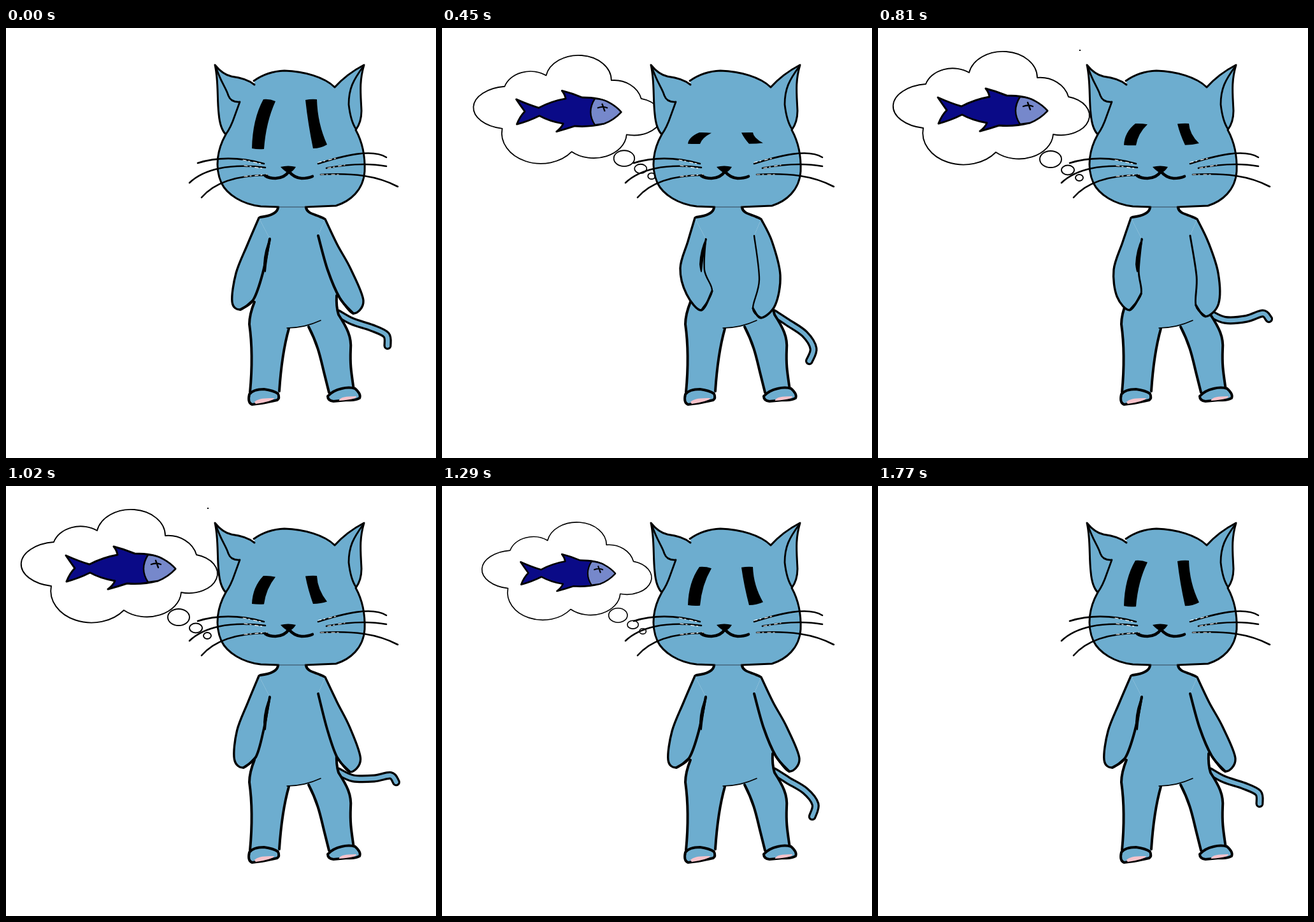
Recreate the animation shown at these times as an HTML page with a canvas. Size 675 by 675 pixels, loop 1800 ms.

```html
<!DOCTYPE html>
<html lang="en">
<head>
<meta charset="utf-8">
<title>Hungry cat</title>
<style>
html, body { margin: 0; width: 100%; height: 100%; overflow: hidden; background: #fff; }
canvas { display: block; width: 675px; height: 675px; }
</style>
</head>
<body>
<canvas id="stage" width="675" height="675"></canvas>
<script>
const ctx = document.getElementById('stage').getContext('2d');
const LOOP = 1800, STEP = 30;
const FUR = '#6dadcf', INK = '#000', PINK = '#f7c3cb';

const path = d => new Path2D(d);
const lerp = (a, b, k) => a + (b - a) * k;

function fill(p, color) { ctx.fillStyle = color; ctx.fill(p); }
function stroke(p, width, color = INK) {
  ctx.lineWidth = width;
  ctx.strokeStyle = color;
  ctx.stroke(p);
}
function shape(p, color, width) { fill(p, color); stroke(p, width); }

// Each key is [time, ...values]; the result is the values at t.
function at(keys, t) {
  let i = 1;
  while (i < keys.length - 1 && keys[i][0] < t) i++;
  const a = keys[i - 1], b = keys[i];
  const k = Math.min(1, Math.max(0, (t - a[0]) / (b[0] - a[0])));
  return a.slice(1).map((v, n) => lerp(v, b[n + 1], k));
}

// Smooth open curve through points.
function curve(pts) {
  const p = new Path2D();
  p.moveTo(...pts[0]);
  for (let i = 0; i < pts.length - 1; i++) {
    const a = pts[i - 1] || pts[i], b = pts[i], c = pts[i + 1], d = pts[i + 2] || c;
    p.bezierCurveTo(
      b[0] + (c[0] - a[0]) / 6, b[1] + (c[1] - a[1]) / 6,
      c[0] - (d[0] - b[0]) / 6, c[1] - (d[1] - b[1]) / 6, c[0], c[1]);
  }
  return p;
}

// ---- thought bubble ----
const cloud = path('M71 157A59 35 0 0 1 75 88A44 35 0 0 1 143 70A54 41 0 0 1 250 78A46 40 0 0 1 299 108A44 30 0 0 1 275 167A54 41 0 0 1 185 195A64 50 0 0 1 71 157Z');
const fish = path('M94 109Q114 118 131 123Q152 112 175 108Q174 101 169 95Q185 99 202 106Q232 106 247 115Q258 121 266 130Q254 143 238 149Q214 155 190 153Q175 158 160 162Q168 156 171 149Q148 145 132 136Q114 145 95 150Q100 137 108 129Q100 118 94 109Z');
const fishHead = path('M223 108Q238 109 247 115Q258 121 266 130Q254 143 238 149L223 151Q209 130 223 108Z');
const fishEye = path('M228 123Q236 120 243 123M235 117L239 128');
const puffs = [[271, 206, 17, 13], [298, 223, 10, 7.5], [316, 235, 6, 5]];
const bubbleIn = [[0, 345, 118, .42], [240, 172, 77, .72], [450, 40, 42, .957], [490, 14, 36, 1]];

function drawBubble(t) {
  if (t === 0 || t >= 1620) return;
  let [x, y, s] = at(bubbleIn, t);
  if (t > 1080) {
    const shrink = .9 * ((t - 1080) / 540) ** 2;
    s = 1 - shrink;
    x = 14 + 296 * shrink;
    y = 36 + 148 * shrink;
  }
  ctx.save();
  ctx.translate(x, y);
  ctx.scale(s, s);
  ctx.translate(-14, -36);
  shape(cloud, '#fff', 1.9);
  for (const [px, py, rx, ry] of puffs) {
    const p = new Path2D();
    p.ellipse(px, py, rx, ry, 0, 0, 7);
    shape(p, '#fff', 1.9);
  }
  shape(fish, '#0a0a87', 3);
  shape(fishHead, '#7688cb', 2.4);
  stroke(fishEye, 2.4);
  ctx.restore();
  if (s === 1) {
    ctx.fillStyle = INK;
    ctx.fillRect(316, 34, 2, 2);
  }
}

// ---- tail: radius, resting angle, swing (degrees) ----
const tailJoints = [[0, 0, 0], [26, 29, 6], [58, 23, 16], [83, 24, 26], [93, 33, 30]];

function drawTail(t) {
  const wave = Math.sin(2 * Math.PI * t / 1180);
  const p = curve(tailJoints.map(([r, rest, swing]) => {
    const a = (rest + swing * wave) * Math.PI / 180;
    return [521 + r * Math.cos(a), 448 + r * Math.sin(a)];
  }));
  stroke(p, 13);
  stroke(p, 6.5, FUR);
}

// ---- body ----
const torso = path('M428 278C428 290 422 295 397 298L414 331C408 375 398 402 390 430C384 445 382 455 382 465C387 500 386 540 383 572L430 572C430 540 436 500 444 471L475 468C492 500 494 520 500 540L507 573L546 568C542 540 540 530 541 505C543 485 535 470 522 450C517 435 521 428 518 415L490 326L501 300C480 295 472 290 470 278Z');
const bodyLines = path('M427 282C426 291 415 295 399 297M471 282C473 292 485 292 499 299M390 430C384 445 382 455 382 465C387 500 386 540 383 572M444 472C436 500 431 540 429 570M475 469C491 500 494 520 499 540L507 572M546 568C542 540 540 530 541 505C543 485 535 470 522 450Q518 437 519 420');
const crotch = path('M441 471Q468 471 494 459');
const feet = [
  ['M382 575Q388 567 405 567Q420 569 427 574Q430 581 426 584Q412 587 402 589L386 591Q379 588 382 575Z',
   'M390 587Q396 580 421 581Q419 586 392 590Z'],
  ['M505 578Q513 569 527 566Q539 563 548 566Q558 575 555 581Q548 585 536 584L514 586Q505 585 505 578Z',
   'M523 584Q525 578 550 578Q551 583 523 585Z']
].map(f => f.map(path));
const wedge = path('M414 330Q405 348 404 371Q406 388 408 382Q410 360 416 331Z');

// Arm outlines from shoulder round the hand to the armpit, hanging and tucked in.
const arms = [
  [[[397, 298], [379, 340], [361, 385], [355, 430], [368, 442], [388, 427], [403, 385], [414, 331]],
   [[397, 298], [386, 335], [374, 377], [384, 418], [407, 443], [424, 413], [412, 380], [414, 331]]],
  [[[501, 300], [520, 340], [541, 378], [561, 428], [545, 448], [524, 424], [505, 380], [490, 326]],
   [[501, 300], [518, 335], [531, 388], [523, 435], [501, 455], [488, 440], [498, 395], [490, 326]]]
];

function drawArms(t) {
  const tuck = t < 1140 ? 1.117 * Math.sin(Math.PI * t / 1140) ** 2 : 0;
  for (const [hang, inward] of arms) {
    const pts = hang.map(([x, y], i) => [lerp(x, inward[i][0], tuck), lerp(y, inward[i][1], tuck)]);
    fill(curve(pts), FUR);
    stroke(curve(pts.slice(0, 6)), 3.4);
    stroke(curve(pts.slice(4)), lerp(4, 2.4, Math.min(1, tuck)));
  }
  fill(wedge, INK);
}

function drawBody(t) {
  fill(torso, FUR);
  stroke(bodyLines, 4);
  stroke(crotch, 1.6);
  for (const [foot, sole] of feet) {
    shape(foot, FUR, 4);
    fill(sole, PINK);
  }
  drawArms(t);
}

// ---- head ----
const skull = path('M390 83Q410 68 437 67C468 68 500 77 516 93Q535 72 562 58C554 85 557 105 558 130Q558 148 549 160C560 180 564 200 563 225C561 255 540 272 518 279L400 280C372 277 347 262 338 243C327 218 332 190 345 167Q336 158 334 135C331 110 334 85 328 58Q340 73 354 76Q378 79 390 88Z');
const skullLine = path('M428 281L400 280C372 277 347 262 338 243C327 218 332 190 345 167Q336 158 334 135C331 110 334 85 328 58Q340 73 354 76Q378 79 390 89M389 83Q410 68 437 67C468 68 500 77 516 93Q535 72 562 58C554 85 557 105 558 130Q558 148 549 160C560 180 564 200 563 225C561 255 540 272 518 279L470 281');
const earLines = path('M329 60C337 85 345 93 349 106Q353 117 367 116Q363 127 359 138Q353 156 345 167M561 60C545 82 538 95 538 120Q541 146 549 158');
const chin = path('M428 281H470');
const nose = path('M431 218Q443 215 455 218Q451 225 444 228Q437 225 431 218Z');
const mouth = path('M444 225Q438 235 423 236Q413 236 407 232M444 225Q452 235 464 236Q474 236 481 233');
const whiskers = path('M301 212C330 203 365 202 405 213M288 243C310 222 350 212 407 219M307 266C328 242 365 231 410 231M490 213C530 200 575 189 597 203M503 220C545 212 575 213 597 217M494 230C545 227 583 232 615 249');
const glints = path('M372 207L405 214M374 216L407 221M374 233L410 230M490 211L520 204M505 220L532 215M494 230L522 230');

// Height of the top of the eyes.
const lids = [[0, 112], [240, 141], [450, 164], [480, 164.5], [810, 150], [1020, 141], [1290, 127], [1770, 117], [1800, 112]];
const eyes = path('M404 112Q414 111 423 115Q408 148 405 190Q395 191 386 189Q387 143 404 112ZM470 113Q479 111 488 112Q489 150 504 183Q494 189 482 189Q474 150 470 113Z');

function drawHead(t) {
  fill(skull, FUR);
  stroke(skullLine, 3);
  stroke(earLines, 2.8);
  stroke(chin, 1.2, '#345');
  stroke(whiskers, 2.6);
  ctx.setLineDash([5, 4, 2, 6]);
  stroke(glints, 1.2, '#fff');
  ctx.setLineDash([]);
  fill(nose, INK);
  stroke(mouth, 4.6);

  const [top] = at(lids, t);
  const bottom = 190 - (top - 112) * 8 / 52;
  ctx.save();
  ctx.translate(0, top);
  ctx.scale(1, (bottom - top) / 78);
  ctx.translate(0, -112);
  fill(eyes, INK);
  ctx.restore();
}

function draw(t) {
  ctx.fillStyle = '#fff';
  ctx.fillRect(0, 0, 675, 675);
  ctx.lineCap = ctx.lineJoin = 'round';
  drawBubble(t);
  drawTail(t);
  drawBody(t);
  drawHead(t);
}

const start = performance.now();
function tick() {
  const t = (performance.now() - start) % LOOP;
  draw(Math.floor(t / STEP) * STEP);
  requestAnimationFrame(tick);
}
tick();
</script>
</body>
</html>
```
